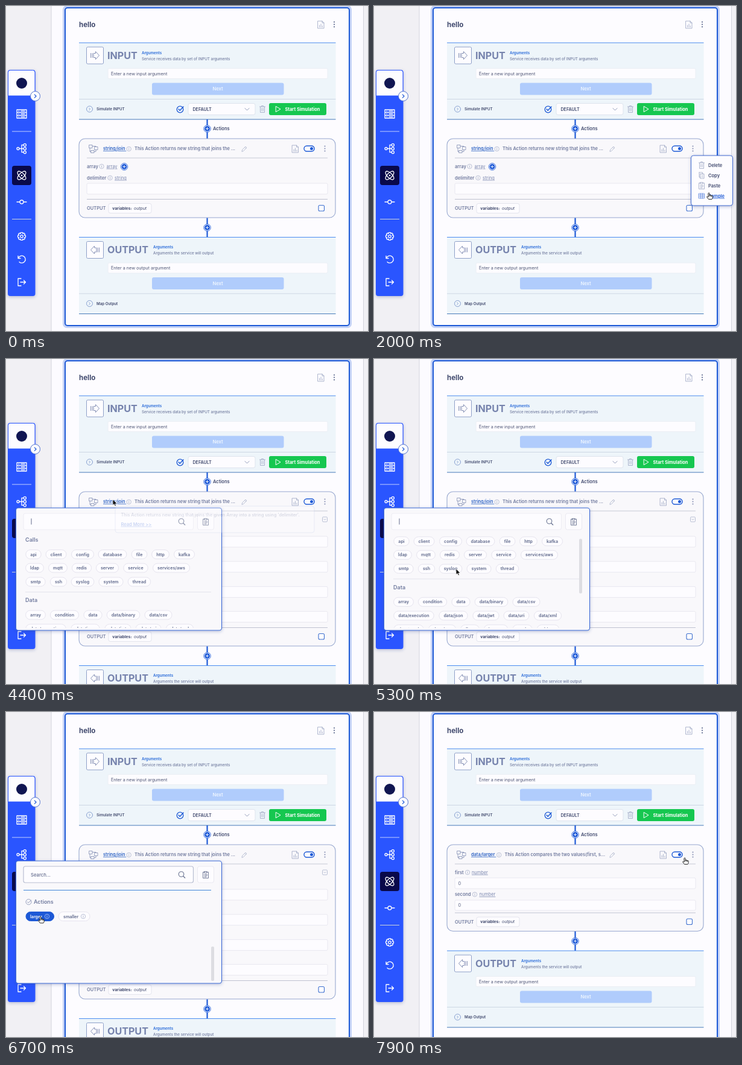
An HTML page for the animation above (8 s loop, 600 px wide and 539 px high).

```html
<!DOCTYPE html>
<html lang="en">
<head>
<meta charset="utf-8">
<title>Service editor</title>
<style>
  html, body { margin: 0; width: 100%; height: 100%; overflow: hidden; background: #f1f0f4; }
  svg { display: block; width: 600px; height: 539px; font-family: Inter, Roboto, sans-serif; }
</style>
</head>
<body>
<svg id="stage" viewBox="0 0 600 539"></svg>
<script>
const BLUE = '#1d59d6', BRIGHT = '#2a55ff', NAVY = '#09094a', INK = '#414a6e', MUTED = '#717b9f', LINK = '#7d89b0';
const FIELD = '#fdfcff', PALE = '#e9e8f0';
const LOOP = 8000, STEP = 100;

// ---- drawing helpers; text is placed by the middle of its capitals ----
const text = (x, y, s, size = 7.5, fill = INK, weight = 600, more = '') =>
  `<text x="${x}" y="${y + size * 0.36}" font-size="${size}" fill="${fill}" font-weight="${weight}" ${more}>${s}</text>`;
const rect = (x, y, w, h, r, fill, stroke = 'none', sw = 1, more = '') =>
  `<rect x="${x}" y="${y}" width="${w}" height="${h}" rx="${r}" fill="${fill}" stroke="${stroke}" stroke-width="${sw}" ${more}/>`;
const disc = (x, y, r, fill, stroke = 'none', sw = 1) =>
  `<circle cx="${x}" cy="${y}" r="${r}" fill="${fill}" stroke="${stroke}" stroke-width="${sw}"/>`;
const line = (x1, y1, x2, y2, stroke, sw = 1) => `<path d="M${x1} ${y1}L${x2} ${y2}" stroke="${stroke}" stroke-width="${sw}"/>`;
const icon = (x, y, d, stroke, sw = 1, fill = 'none') =>
  `<path transform="translate(${x} ${y})" d="${d}" stroke="${stroke}" stroke-width="${sw}" fill="${fill}" stroke-linejoin="round" stroke-linecap="round"/>`;
const link = (x, y, s) => text(x, y, s, 7.4, LINK, 400, 'text-decoration="underline"');
const middle = 'text-anchor="middle"';
const shadow = 'filter="url(#shadow)"';

const info = (x, y, c = '#a3abc6') => disc(x, y, 3.7, 'none', c, 0.7) + icon(x, y, 'M0-.4V1.7M0-1.8V-1.7', c, 0.8);
const report = (x, y) => icon(x, y, 'M-5-6H2L5-3V6H-5ZM2-6V-3H5M-2.4 4V1M0 4V-1M2.4 4V2', '#9aa4c2', 0.8);
const dots = (x, y, c) => [-4, 0, 4].map(k => disc(x, y + k, 1.1, c)).join('');
const plus = (x, y) => disc(x, y, 5.8, '#e3ebff', BLUE, 0.8) + disc(x, y, 4.4, BLUE) + icon(x, y, 'M-2.2 0H2.2M0-2.2V2.2', '#fff', 0.9);
const trash = (x, y) => icon(x, y, 'M-4.5-4H4.5M-3.5-4V5.5H3.5V-4M-1.5-4V-5.5H1.5V-4M-1.2-1.5V3M1.2-1.5V3', '#a5aec9', 0.9);
const clipboard = (x, y, c) => icon(x, y, 'M-2-4.5H-4.5V5.5H4.5V-4.5H2M-2-5.5H2V-3H-2ZM-2-.5H2.5M-2 1.5H2.5M-2 3.5H1', c, 0.9);
const field = (x, y, value = '', h = 18) => rect(x, y, 533 - x, h, 2, FIELD, PALE) + text(x + 5.5, y + h / 2, value, 7.3, '#596181', 400);

const meter = document.createElement('canvas').getContext('2d');
meter.font = '600 7.1px Inter, Roboto, sans-serif';
function chip(x, y, s, lit) {
  const w = meter.measureText(s).width + 15;
  return rect(x - w / 2, y - 7.5, w, 15, 7.5, lit ? BLUE : FIELD, lit ? BLUE : '#e6e4ee') +
    text(x, y, s, 7.1, lit ? '#fff' : '#5c6689', 600, middle);
}

// ---- time helpers ----
const clamp = (v, a, b) => Math.min(b, Math.max(a, v));
const ease = (t, a, b) => { const p = clamp((t - a) / (b - a), 0, 1); return p * p * (3 - 2 * p); };

// time, x, y of the pointer tip
const route = [
  [200, 430, 340], [1100, 529, 236], [1400, 529, 236], [1800, 555, 309.5], [2800, 555, 309.5], [3000, 540, 300],
  [3700, 208.5, 242], [4000, 177, 233], [4600, 177, 233], [5100, 136, 348], [5800, 136, 348], [5950, 144, 341],
  [6250, 144, 341], [6600, 57, 339], [7300, 57, 339], [7800, 515, 241.5]
];
const handTimes = [[1000, 1400], [1700, 2900], [3600, 4200], [5900, 6250], [6500, 7300], [7700, LOOP]];

function pointer(t) {
  if (t < route[0][0]) return '';
  const n = route.findIndex(p => p[0] > t);
  const b = n < 0 ? route[route.length - 1] : route[n], a = n < 0 ? b : route[n - 1];
  const p = a === b ? 1 : ease(t, a[0], b[0]);
  const x = a[1] + (b[1] - a[1]) * p, y = a[2] + (b[2] - a[2]) * p;
  return handTimes.some(([from, to]) => t >= from && t < to)
    ? icon(x, y, 'M-1 1Q0-.6 1 1V4.2Q2 3.3 3 4.5Q4 3.7 4.7 5Q6 4.5 6.2 6V8Q6 10 5 11H-.5L-3.5 7Q-3.5 5.5-1 7ZM1 4.2V6M3 4.7V6.2M4.7 5.2V6.5', '#111', 0.9, '#fff')
    : icon(x, y, 'M0 0V9.5L2.2 7.6L3.7 11L5.4 10.2L3.9 7H6.9Z', '#fff', 0.7, '#111');
}

// ---- page parts ----
function sidebar() {
  const white = (y, d) => icon(26, y, d, '#fff', 1.3);
  let teeth = '';
  for (let k = 0; k < 8; k++) {
    const a = k * Math.PI / 4, at = (r, o) => `${(r * Math.cos(a + o)).toFixed(2)} ${(r * Math.sin(a + o)).toFixed(2)}`;
    teeth += `${k ? 'L' : 'M'}${at(4.8, -0.4)}L${at(6.6, -0.22)}L${at(6.6, 0.22)}L${at(4.8, 0.4)}`;
  }
  return rect(3, 106, 45.5, 375, 4, BRIGHT, 'none', 0, shadow) +
    '<path d="M3.5 149V110Q3.5 106.500 7 106.500H44.500Q48 106.500 48 110V149Z" fill="#fdfcff" stroke="#2a55ff"/>' +
    disc(26, 128, 9, '#101552') +
    disc(48.5, 149.5, 8, FIELD, '#4e70ce') + icon(48.5, 149.5, 'M-1.2-2.7L1.5 0L-1.2 2.7', BLUE, 1.2) +
    line(10, 208, 42, 208, '#c3d0ff') + line(10, 353.500, 42, 353.500, '#cdd5d8') +
    rect(10, 265, 32, 32, 4, NAVY) +
    white(179, 'M-8-7H8V-2.500H-8ZM-8-2.500H8V2.500H-8ZM-8 2.500H8V7H-8ZM-5-4.800H-4.500M-5 0H-4.500M-5 4.800H-4.500M-1-4.800H5M-1 0H5M-1 4.800H5') +
    white(236.5, 'M-4 0H3M3-6H0V6H3M-8 0A2 2 0 1 0-4 0A2 2 0 1 0-8 0M3-6A2.200 2.200 0 1 0 7.400-6A2.200 2.200 0 1 0 3-6M3 0A2.200 2.200 0 1 0 7.400 0A2.200 2.200 0 1 0 3 0M3 6A2.200 2.200 0 1 0 7.400 6A2.200 2.200 0 1 0 3 6') +
    [45, -45].map(a => `<ellipse cx="26" cy="281" rx="9" ry="4" transform="rotate(${a} 26 281)" fill="none" stroke="#fff" stroke-width="1.3"/>`).join('') +
    disc(26, 281, 1.3, '#fff') +
    white(325, 'M-8 0H-3M3 0H8M-3 0A3 3 0 1 0 3 0A3 3 0 1 0-3 0') +
    white(382, teeth + 'ZM-2.200 0A2.200 2.200 0 1 0 2.200 0A2.200 2.200 0 1 0-2.200 0') +
    white(420, 'M-6-5.500V-1.500H-2M-5.500-1.800A6 6 0 1 1-4 4.500') +
    white(458, 'M-1-6H-6V6H-1M-2 0H6.500M3.500-3L6.500 0L3.500 3');
}

function block(y, title, subX, sub, hint, foot, arrow) {
  return rect(121, y, 425.5, 127, 0, '#eef5fa') +
    line(121, y, 546.5, y, '#4a8cf0', 1.2) + line(121, y + 127, 546.5, y + 127, '#4579b8') +
    rect(133.5, y + 7, 28, 28, 2, FIELD, '#8ea0c8') + icon(147.500, y + 21, arrow, '#8792b6', 1) +
    text(168, y + 21, title, 16.1, '#7683ad', 700) +
    text(subX, y + 16.5, 'Arguments', 6.2, '#2467d8', 600) + text(subX, y + 26.3, sub, 6.25, MUTED, 500) +
    rect(169, y + 42.5, 364, 17, 2, FIELD, '#e8edf3', 0.8) + text(174, y + 51, hint, 7.2, '#4e5574', 400) +
    rect(242, y + 66.5, 218.5, 20, 3, '#b0ccfc') + text(351, y + 76.5, 'Next', 7.6, '#eff6ff', 600, middle) +
    line(121, y + 93.5, 546.5, y + 93.5, '#c5d0df', 0.8) +
    disc(138.5, y + 110, 5, 'none', '#7c97cb', 0.9) + icon(138.5, y + 110, 'M-.8-1.800L1 0L-.8 1.800', '#7c97cb', 0.9) +
    text(150, y + 110, foot, 6.2, INK, 600);
}

const simulation = () =>
  disc(288.5, 171.5, 5.3, 'none', BLUE, 1.3) + icon(288.500, 171, 'M-2.500 0L-.3 2.300L5.500-4', BLUE, 1.500) +
  rect(302, 161.5, 111, 19, 3, FIELD, '#dde4ee') + text(309.5, 171, 'DEFAULT', 7.1, INK, 600) +
  icon(399.5, 171, 'M-3.500-1.500L0 2L3.500-1.500', '#8590b0', 0.9) + trash(425, 171) +
  rect(436, 161, 95, 20, 3, '#16c750') + icon(451, 171, 'M-3.500-4.500L4 0L-3.500 4.500Z', '#fff', 1) +
  text(462.5, 171, 'Start Simulation', 7.4, '#fff', 700);

function cardBody(mode) {
  if (mode === 2) {
    return text(134, 266, 'first', 7.5, MUTED) + info(155, 266) + link(162, 266, 'number') + field(134, 275, '0') +
      text(134, 302.5, 'second', 7.5, MUTED) + info(167, 302.5) + link(174.5, 302.5, 'number') + field(134, 312, '0', 17);
  }
  const d = mode ? 124.5 : 0;
  let s = text(134, 266, 'array', 7.5, MUTED) + info(158.5, 266) + link(166.5, 266, 'array') + plus(196, 266.5) +
    text(134, 285 + d, 'delimiter', 7.6, MUTED) + info(172.5, 285 + d) + link(180, 285 + d, 'string') +
    field(134, 294 + d, mode ? '=' : '');
  if (mode) {
    s += rect(524.5, 262, 8, 8, 1.5, 'none', '#a9b1cb', 0.8) + icon(528.500, 266, 'M-1.800-.8L0 1L1.800-.8', '#a9b1cb', 0.8) +
      line(134.500, 278, 134.500, 398, PALE);
    for (let k = 0; k < 3; k++) s += link(147.5, 284.5 + 41.7 * k, 'string') + field(144, 294 + 41.7 * k, k + 1);
  }
  return s;
}

function card(mode, d) {
  const larger = mode === 2, x = larger ? 3.5 : 0;
  return rect(121, 220, 425, 131 + d, 10, '#f9f8fb', '#98a8d0', 1.1) +
    icon(145, 236.5, 'M-7-6H-2V-1H-7ZM2-3H7V2H2ZM-4 3H1V7H-4ZM-2-4H4V-3M-6-1V5H-4M1 5H4V2', '#8f9abc', 0.9) +
    text(161, 236.5, (larger ? 'data/larger' : 'string/join') + '&#160;', 7.4, '#2c62c4', 600, 'text-decoration="underline"') +
    info(203.7 + x, 237) +
    text(213 + x, 236.5, larger ? 'This Action compares the two values(first, s...' : 'This Action returns new string that joins the ...', 7.5, MUTED, 600) +
    icon(395, 237, 'M-4 4L-3.300 1.300L2-4L4-2L-1.300 3.300ZM.6-2.600L2.600-.6', '#a9b1ca', 0.8) + report(479.5, 237) +
    rect(494, 232, 17, 9, 4.5, FIELD, BLUE, 1.4) + disc(506.5, 236.5, 2.5, BLUE) + dots(528.5, 236.5, '#8791b4') +
    line(134, 252, 533, 252, '#b9bdcc', 0.8) + cardBody(mode) +
    line(134, 320.5 + d, 533, 320.5 + d, '#b0b5c7', 0.8) +
    text(134, 335.5 + d, 'OUTPUT', 7.5, MUTED, 600) +
    rect(170, 327.5 + d, 71, 16, 3, FIELD, '#e4e4ed') + text(176.3, 335.5 + d, 'variables:', 6.7, INK, 700) +
    text(212, 335.5 + d, 'output', 6.9, INK, 400, 'font-style="italic"') +
    rect(518, 330.5 + d, 9.5, 9.5, 2, FIELD, '#3e70cf', 1.1);
}

function menu(t) {
  const hover = t >= 1750;
  const row = (y, s) => text(554, y, s, 7.5, INK, 600);
  return rect(525.5, 248, 69, 83, 4, FIELD, '#4169cf', 1, shadow) +
    trash(543, 264) + row(264, 'Delete') +
    icon(543, 281, 'M-4-5H1.500V-2.500M-4-5V3H-2M-2-2.500H4V5H-2ZM0 0H2M0 2.500H2', '#a5aec9', 0.9) + row(281, 'Copy') +
    clipboard(543, 298, '#a5aec9') + row(298, 'Paste') +
    icon(543, 315, 'M-4.500-4H4.500V4H-4.500ZM-4.500-1.500H4.500M-4.500 1.300H4.500M-1.500-4V4M1.500-4V4', hover ? '#5f87dd' : '#a5aec9', 0.8) +
    text(554, 315, 'Sample', 7.5, hover ? BLUE : INK, 600, hover ? 'text-decoration="underline"' : '');
}

const heads = [[300, 'Calls'], [400, 'Data'], [523.5, 'Flow']];
const rows = [
  [324, 'api 45.5 client 83 config 127 database 176.5 file 221 http 256 kafka 295.5'],
  [346.5, 'ldap 47.5 mqtt 86 redis 125.5 server 168 service 215 services/aws 274'],
  [369.5, 'smtp 49 ssh 87 syslog 127 system 174 thread 221'],
  [424.5, 'array 49 condition 97 data 144 data/binary 194.5 data/csv 252.5'],
  [447.3, 'data/execution 66 data/json 131.5 data/jwt 185.5 data/uri 236 data/xml 288'],
  [470, 'data/yaml 57.5 datetime 113 float 159 integer 202 math 246 object 288.5'],
  [492.5, 'security 54.5 string 102 uuid 142.5 variable 186.5'],
  [547.5, 'loop 47 event 87']
];

function popup(t) {
  const picked = t >= 6100;
  const scroll = 83.5 * ease(t, 5100, 5700) + 205.5 * ease(t, 6100, 6500);
  let list = heads.map(([y, s]) => text(32, y, s, 9, MUTED, 600)).join('') +
    line(32, 386.5, 340, 386.5, '#e4e4ec') + line(32, 511, 340, 511, '#e4e4ec');
  for (const [y, names] of rows) {
    const w = names.split(' ');
    for (let k = 0; k < w.length; k += 2) list += chip(+w[k + 1], y, w[k], w[k] === 'data' && t >= 5900 && t < 6300);
  }
  if (picked) {
    const lit = t >= 6500;
    list += line(29, 584.5, 340, 584.5, '#3f86d8', 1.2) +
      disc(37.5, 604, 4.5, 'none', '#8d97b7', 0.9) + icon(37.500, 604, 'M-2 0L-.3 1.600L4-3', '#8d97b7', 1) +
      text(46, 604, 'Actions', 8.9, MUTED, 600) +
      rect(33, 620.5, 46.5, 15, 7.5, lit ? BLUE : FIELD, lit ? BLUE : '#e6e4ee') + text(40, 628, 'larger', 7.1, lit ? '#fff' : '#5c6689', 600) +
      info(68, 628, lit ? '#c9d8ff' : '#a3abc6') +
      rect(87, 620.5, 52, 15, 7.5, FIELD, '#e6e4ee') + text(95, 628, 'smaller', 7.1, '#5c6689', 600) + info(128, 628);
  }
  const height = picked ? 449 : 283, view = 160;
  const bar = t >= 5100 ? rect(340, 286 + scroll / height * view, 5, view * view / height, 2, '#dddde2') : '';
  const caret = !picked && (t - 4300) % 1000 < 500;
  return rect(16.5, 247, 341, 203, 4, '#f9f8fb', '#3c6bd6', 1.1, shadow) +
    `<g clip-path="url(#list)"><g transform="translate(0 ${-scroll})">${list}</g>${bar}</g>` +
    rect(29, 256, 281.5, 27, 3, FIELD, picked ? '#b9bfd2' : '#eeedf4', picked ? 1.2 : 1) +
    (picked ? text(41, 270, 'Search...', 7.7, '#626b8c', 500) : '') + (caret ? line(42, 264.5, 42, 274.5, '#626b8c') : '') +
    disc(290.5, 269, 4.3, 'none', '#66708f', 1.1) + line(293.5, 272, 297, 275.5, '#66708f', 1.2) +
    rect(317.5, 256, 27, 27, 3, FIELD, '#eae9f1') + clipboard(331, 270, '#66708f');
}

function tooltip(t) {
  const shown = ease(t, 3900, 4100) * (1 - ease(t, 4200, 4500));
  return shown <= 0 ? '' : `<g opacity="${shown}">` + rect(181, 244, 330, 44, 4, FIELD, '#b9c6e6') +
    text(190.5, 258.5, "This Action returns new string that joins the given Array into a string using 'delimiter'.", 7.3, MUTED, 500) +
    text(190.5, 274, 'Read More &gt;&gt;', 7.5, '#3c6bd6', 600, 'text-decoration="underline"') + '</g>';
}

const defs = `<defs>
  <filter id="shadow" x="-20%" y="-20%" width="140%" height="140%"><feDropShadow dx="0" dy="1.5" stdDeviation="2.5" flood-color="#27408a" flood-opacity=".32"/></filter>
  <clipPath id="list"><rect x="17" y="284" width="340" height="162"/></clipPath></defs>`;

function scene(t) {
  const mode = t < 2900 ? 0 : t < 7300 ? 1 : 2;
  const d = [0, 125, 12.5][mode];
  return defs + rect(0, 0, 600, 539, 0, '#f1f0f4') + rect(75, -5, 517.5, 549, 0, '#fcfbff', '#d3d4dd') +
    rect(96, 1, 475, 531 + d, 5, 'none', '#c4d2f6', 4) + rect(98, 3, 471, 527 + d, 4, FIELD, BLUE, 2) +
    text(121, 30.5, 'hello', 11.5, INK, 700) + report(522, 31) + dots(544, 30.5, '#59638a') +
    block(61, 'INPUT', 225, 'Service receives data by set of INPUT arguments', 'Enter a new input argument', 'Simulate INPUT',
      'M-7-3.500V3.500M-4.500-3.500V3.500M-2-3.500H1V-6.500L7 0L1 6.500V3.500H-2Z') +
    simulation() +
    line(333.5, 188, 333.5, 220, BLUE, 2.2) + plus(333.5, 203.5) + text(343, 203.5, 'Actions', 7.5, INK, 600) +
    card(mode, d) +
    line(333.5, 351.5 + d, 333.5, 383.5 + d, BLUE, 2.2) + plus(333.5, 367.5 + d) +
    block(383.5 + d, 'OUTPUT', 244, 'Arguments the service will output', 'Enter a new output argument', 'Map Output',
      'M7-3.500V3.500M4.500-3.500V3.500M2-3.500H-1V-6.500L-7 0L-1 6.500V3.500H2Z') +
    sidebar() +
    (t >= 1400 && t < 2900 ? menu(t) : '') +
    (t >= 4300 && t < 7300 ? popup(t) : '') + tooltip(t) + pointer(t);
}

const stage = document.getElementById('stage');
let last = -1;
function frame(now) {
  const t = Math.floor(now % LOOP / STEP) * STEP;
  if (t !== last) stage.innerHTML = scene(last = t);
  requestAnimationFrame(frame);
}
frame(0);
</script>
</body>
</html>
```
